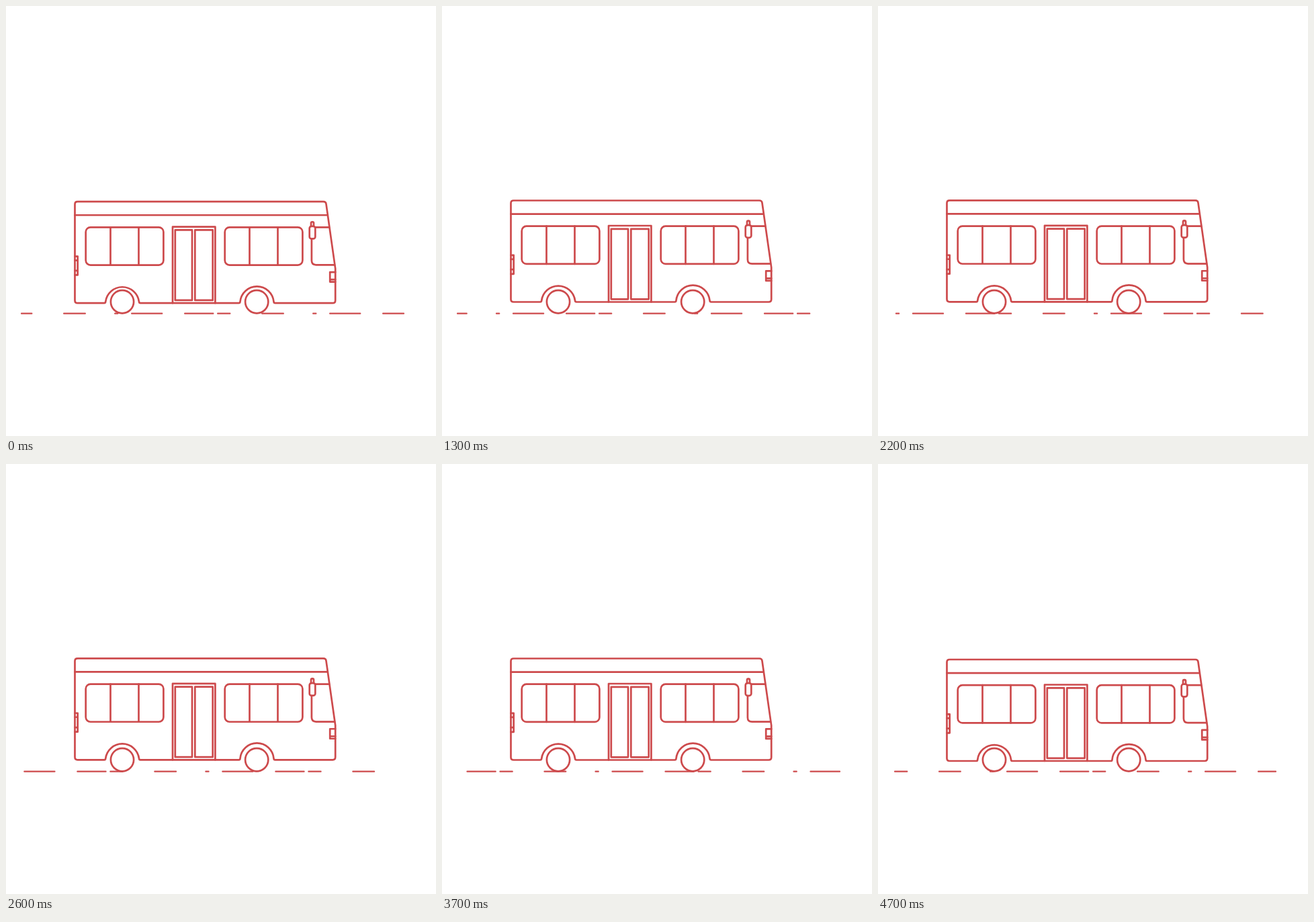
These frames come from a looping animation (640x640 px, 4.8 s). An HTML page:

```html
<!DOCTYPE html>
<html lang="en">
<head>
<meta charset="utf-8">
<title>Bus ride</title>
<style>
  html, body { margin: 0; width: 100%; height: 100%; overflow: hidden; background: #fff; }
  svg { display: block; width: 100%; height: 100%; }
</style>
</head>
<body>
<svg viewBox="0 0 640 640" fill="none" stroke="#cd4a4c" stroke-width="2.7" stroke-linecap="round" stroke-linejoin="round">
  <defs>
    <g id="window">
      <rect x="118.7" y="329.5" width="115.7" height="56.2" rx="7"/>
      <path d="M155.5 329.5v56.2M197.5 329.5v56.2"/>
    </g>
  </defs>
  <path id="road" d="M23 457.7H592" stroke-width="2.2" stroke-dasharray="31.8 44.2 4.3 20.7 45.2 33.8 42.3 6.7 18.3 47.7"/>
  <g id="bus">
    <!-- body with wheel arches -->
    <path d="M106.5 291.3H472.5Q476 291.3 476.5 294.8L490.2 391V438.3Q490.2 442.3 486.2 442.3H400.5Q398.7 442.3 398.5 440.3A25.1 25.1 0 0 0 348.5 440.3Q348.3 442.3 346.5 442.3H200Q198.2 442.3 198 440.3A25.1 25.1 0 0 0 148.2 440.3Q148 442.3 146.2 442.3H106.5Q102.5 442.3 102.5 438.3V295.3Q102.5 291.3 106.5 291.3Z"/>
    <path d="M102.5 311.4H478.5"/>
    <use href="#window"/>
    <use href="#window" x="207"/>
    <!-- doors -->
    <path d="M248 442.3V328.8H311.4V442.3"/>
    <rect x="251.8" y="333.6" width="25.2" height="104.5"/>
    <rect x="281.3" y="333.6" width="26.4" height="104.5"/>
    <!-- cab window and mirror -->
    <path d="M481 329.5H460.2M454.9 347V379Q454.9 385.5 461.4 385.5H489"/>
    <rect x="451.7" y="328" width="8.6" height="18.6" rx="3"/>
    <path d="M454 328V323.2Q454 321.4 456 321.4T458 323.2V328"/>
    <!-- lamps -->
    <path d="M102.5 372.7H106.7V400.6H102.5M102.5 378.7H106.7M102.5 394H106.7"/>
    <path d="M490.2 396.2H482.2V410.7H490.2M482.2 407.2H490.2"/>
  </g>
  <circle cx="173" cy="440.2" r="17.1"/>
  <circle cx="373.2" cy="440.2" r="17.1"/>
</svg>
<script>
  const LOOP = 4800, HOLD = 100, PERIOD = 295, BOUNCE = 2.1;
  const road = document.getElementById('road');
  const bus = document.getElementById('bus');

  function draw(now) {
    const step = Math.floor(now % LOOP / HOLD);
    const tick = Math.round(step * 2.51 - 0.1); // 120 ticks per loop
    const lift = BOUNCE * (1 - Math.cos(2 * Math.PI * (tick / 10 + 0.08))) / 2;
    road.setAttribute('stroke-dashoffset', (231.9 + tick * PERIOD / 120) % PERIOD);
    bus.setAttribute('transform', `translate(0 ${-lift})`);
  }

  function loop() {
    draw(performance.now());
    requestAnimationFrame(loop);
  }
  loop();
</script>
</body>
</html>
```
